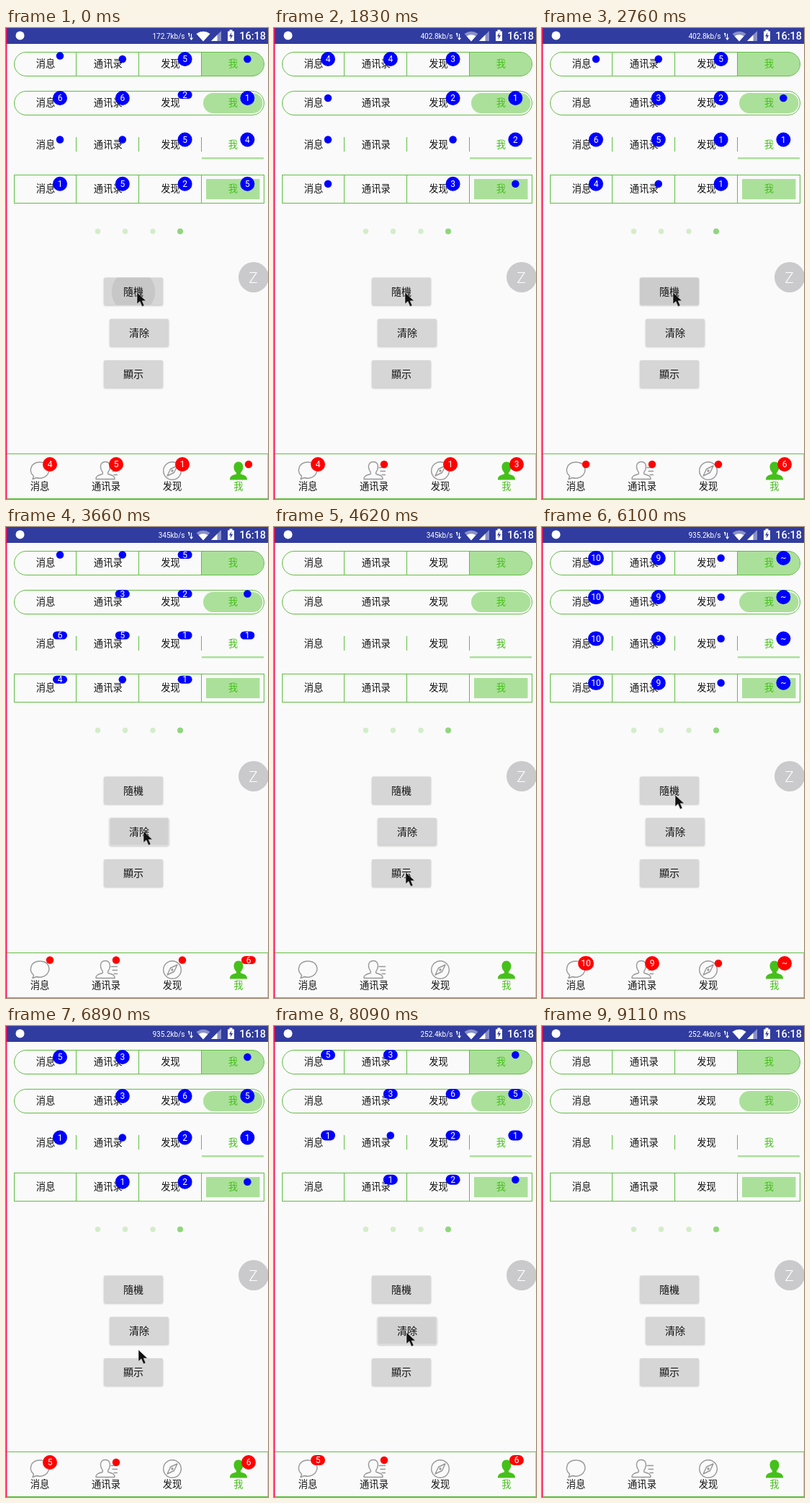
These frames come from a looping animation (364 px wide and 652 px high, 9.48 s). An HTML page:

```html
<!DOCTYPE html>
<html lang="zh">
<head>
<meta charset="utf-8">
<title>Badge demo</title>
<style>
  html, body { margin: 0; width: 100%; height: 100%; overflow: hidden; background: #fafafa; }
  svg { display: block; width: 364px; height: 652px; }
  text { font-family: "Noto Sans CJK SC", "Noto Sans CJK TC", "Noto Sans CJK", sans-serif; font-weight: 500; text-anchor: middle; fill: #111; }
  .tab { font-size: 13.3px; }
  .on { fill: #45c01a; }
  .btn { font-size: 14px; }
  .num { font: 12px Roboto, sans-serif; fill: #fff; }
  .status { font: 10px Roboto, sans-serif; fill: #fff; text-anchor: end; }
  .clock { font: 500 14.5px Roboto, sans-serif; fill: #fff; }
  .line { fill: none; stroke: #62bd45; }
  .icon { fill: none; stroke: #989898; stroke-width: 1.4; stroke-linejoin: round; }
  .lit { fill: #abe09a; }
  .soft { filter: drop-shadow(0 1px 1px rgba(0, 0, 0, .22)); }
</style>
</head>
<body>
<svg id="stage" viewBox="0 0 364 652">
  <defs>
    <clipPath id="face"><rect x="136" y="345.500" width="82" height="38" rx="2"/></clipPath>
  </defs>
  <rect width="364" height="652" fill="#fafafa"/>

  <g id="bar">
    <rect width="364" height="22" fill="#303c9f"/>
    <circle cx="19.500" cy="10.500" r="6" fill="#fff"/>
    <text id="speed" class="status" x="248.500" y="14.500"></text>
    <path d="M254.500 7v5M253 8.500l1.500-1.500M257.500 8v8M255.500 13.500l2 2.500 2-2.500" fill="none" stroke="#fff" stroke-width="1.2"/>
    <path d="M264.500 8Q274 1.500 283.500 8L274 18.500Z" fill="#8a91c9"/>
    <path id="wifi" fill="#fff"/>
    <path d="M299 4V18H285Z" fill="#8a91c9"/>
    <path d="M293.500 9.500V18H285Z" fill="#fff"/>
    <path d="M308 4.500h2.500v-2h4v2h2.500v13.500h-9Z" fill="#fff"/>
    <path d="M313.500 6l-3.500 5.500h2.300l-.8 4.500 3.600-6h-2.400Z" fill="#303c9f"/>
    <text class="clock" x="342.700" y="15.800">16:18</text>
  </g>

  <g id="frames">
    <path class="lit" d="M271.500 33.500H341.500A16.500 16.500 0 0 1 341.500 66.500H271.500Z"/>
    <rect class="line" x="11.500" y="33.500" width="347" height="33" rx="16.500"/>
    <rect class="line" x="11.500" y="87.500" width="347" height="33" rx="16.500"/>
    <rect class="lit" x="274" y="90" width="82.500" height="28" rx="14"/>
    <rect class="lit" x="272" y="179" width="86" height="2.500"/>
    <rect class="line" x="11.500" y="203.500" width="347" height="39"/>
    <rect class="lit" x="278" y="209" width="74.500" height="28"/>
    <path class="line" d="M97.500 33v33M184.500 33v33M271.500 33v33M97.500 151v20M184.500 151v20M271.500 151v20M97.500 203v40M184.500 203v40M271.500 203v40"/>
    <g fill="#d3edc9"><circle cx="127.500" cy="281.500" r="3.700"/><circle cx="165.500" cy="281.500" r="3.700"/><circle cx="204" cy="281.500" r="3.700"/></g>
    <circle cx="242" cy="281.500" r="4" fill="#8fd67c"/>
  </g>

  <g id="buttons"></g>
  <circle id="ripple" cx="177" cy="365" fill="#c7c7c8" clip-path="url(#face)"/>
  <g id="captions"></g>

  <circle cx="344" cy="345" r="21" fill="#cacacc"/>
  <text x="343.500" y="352.500" style="font:300 21px Roboto,sans-serif;fill:#fff">Z</text>

  <rect x="0" y="589.500" width="364" height="62" fill="#fafafa" stroke="#62bd45"/>
  <g class="icon">
    <path d="M38.500 620.500C31 614 34 601 47 601S62.500 612 57 619C53 623.500 46 624 42.500 622.500L37 624.500Z"/>
    <path d="M125 624.500C124.500 619.500 130 619 134 617.500C135.500 616 133.500 614 132.500 612C130 606 132 600.500 138 600.500S145.500 606 143.500 612C142.500 614 140.500 616 142 617.500C146 619 151.500 619.500 151 624.500Z"/>
    <path d="M145.500 608.500H155M147.500 613.500H155M149.500 618.500H155"/>
    <circle cx="231" cy="613" r="12.300"/>
    <path d="M238 606L233.500 615.500 224 620 228.500 610.500Z"/>
    <circle cx="231" cy="613" r="1"/>
  </g>
  <path class="on" d="M311 625.500C310.500 619.500 316 619 320 617.500V615.500C314.500 611 315.500 600.500 323 600.500S331.500 611 326 615.500V617.500C330 619 335.500 619.500 335 625.500Z"/>

  <g id="labels"></g>
  <g id="badges"></g>
  <rect width="1.300" height="652" fill="#ff0a55"/>
  <path id="cursor" d="M0 0V16L4 12.500 7 19.500 10 18.200 7.200 11.700H12.500Z" fill="#111" stroke="#eee" stroke-width=".5"/>
</svg>

<script>
const LOOP = 9480, GROW = 300;
const $ = id => document.getElementById(id);

function add(parent, tag, attrs, text) {
  const el = document.createElementNS('http://www.w3.org/2000/svg', tag);
  set(el, attrs);
  if (text) el.textContent = text;
  return parent.appendChild(el);
}
function set(el, attrs) {
  for (const k in attrs) el.setAttribute(k, attrs[k]);
}
const clamp = v => Math.max(0, Math.min(1, v));

// Screen updates come in bursts: first, last, count
const bursts = [[120, 420, 3], [1140, 1560, 4], [1830, 1830, 1], [2490, 3390, 8], [3660, 4620, 8],
  [4870, 5800, 8], [5950, 6100, 2], [6380, 7280, 8], [7430, 8450, 9], [8600, 9110, 5]];
const ticks = [0];
for (const [a, b, n] of bursts)
  for (let i = 0; i < n; i++) ticks.push(a + (b - a) * i / Math.max(1, n - 1));

// Badge sets, four per row: '.' is a dot, '-' is hidden
const parse = s => s.split(' ');
const none = Array(20).fill('-');
const first = parse('. . 5 . 6 6 2 1 . . 5 4 1 5 2 5 4 5 1 .');
const events = [
  { at: -165, set: first, button: 0 },
  { at: 1030, set: parse('4 4 3 - . - 2 1 . - . 2 . - 3 . 4 . 1 3'), button: 0 },
  { at: 2380, set: parse('. . 5 - - 3 2 . 6 5 1 1 4 . 1 - . . . 6'), button: 0 },
  { at: 3525, set: none, button: 1 },
  { at: 4760, set: parse(Array(5).fill('10 9 . ~').join(' ')), button: 2 },
  { at: 6270, set: parse('5 3 - . - 3 6 5 1 . 2 1 - 1 2 . 5 . - 6'), button: 0 },
  { at: 7977, set: none, button: 1 }
];
const before = first.map((v, i) => i === 0 || i === 6 ? '-' : v);

const speeds = [[0, '172.7'], [1830, '402.8'], [3100, '345'], [5700, '935.2'], [7600, '252.4']];
const path = [[0, 182, 366], [2800, 182, 366], [3390, 191, 421], [4050, 191, 421], [4620, 183, 478],
  [5400, 183, 478], [5800, 185, 402], [6100, 185, 371], [6640, 185, 371], [6890, 184, 448],
  [7150, 184, 462], [7430, 184, 462], [7940, 184, 424], [8200, 184, 424], [8450, 200, 450], [9110, 300, 656], [LOOP, 300, 656]];

const tabs = ['消息', '通讯录', '发现', '我'];
const rows = [49.5, 103.5, 161.5, 222.5, 634.5];
const tops = [33, 87, 144.5, 205.7, 594];
const badges = [];
rows.forEach((y, r) => tabs.forEach((name, c) => {
  const foot = r === 4;
  const shift = (foot ? 92 : 86.8) * c;
  add($('labels'), 'text', { class: c === 3 ? 'tab on' : 'tab', x: (foot ? 47 : 55) + shift, y: y + 4.7 }, name);
  const x = (foot ? 61 : 75) + shift;
  badges.push({
    x, top: tops[r],
    pill: add($('badges'), 'rect', { fill: foot ? '#f00' : '#00f' }),
    num: add($('badges'), 'text', { class: 'num', x })
  });
}));

const buttons = [['隨機', 136, 345.5], ['清除', 144, 402.7], ['顯示', 136, 460]].map(([name, x, y]) => {
  add($('captions'), 'text', { class: 'btn', x: x + 41, y: y + 24.3 }, name);
  return add($('buttons'), 'rect', { class: 'soft', x, y, width: 82, height: 38, rx: 2 });
});

function drawBadge(b, from, to, p) {
  const gone = to === '-';
  const label = gone ? from : to;
  const space = label === '-' ? 0 : gone ? 20 * (1 - p) : from === '-' ? 20 * p : 20;
  const dot = label === '.';
  const mid = b.top + space / 2;
  const height = dot ? Math.min(10.5, space) : space;
  const width = dot ? 10.5 : label.length > 1 ? 22 : 20;
  set(b.pill, { x: b.x - width / 2, y: mid - height / 2, width, height, rx: height / 2 });
  b.num.textContent = dot || space < 8 ? '' : label;
  b.num.setAttribute('y', mid + 4.2);
}

function draw(time) {
  const t = ticks.filter(k => k <= time + 15).pop();

  const i = events.filter(e => e.at <= t).length - 1;
  const now = events[i], from = i ? events[i - 1].set : before;
  const p = (t - now.at) / GROW;
  badges.forEach((b, n) => drawBadge(b, from[n], now.set[n], clamp(p)));

  buttons.forEach((el, n) => {
    const down = n && n === now.button && p < 1.6;
    set(el, { fill: down ? '#d1d1d2' : '#d6d6d7', stroke: down ? '#e4e4e5' : 'none' });
  });
  set($('ripple'), { r: now.button ? 0 : 55 * clamp(p), opacity: clamp((1.7 - p) / 0.7) });

  $('speed').textContent = speeds.filter(s => s[0] <= t).pop()[1] + 'kb/s';
  const weak = t >= 120 && t < 8600;
  $('wifi').setAttribute('d', weak ? 'M267.500 11.300Q274 7 280.500 11.300L274 18.500Z' : 'M264.500 8Q274 1.500 283.500 8L274 18.500Z');

  const k = path.findIndex(q => q[0] > t);
  const [t0, x0, y0] = path[k - 1], [t1, x1, y1] = path[k];
  const f = (t - t0) / (t1 - t0);
  $('cursor').setAttribute('transform', `translate(${x0 + (x1 - x0) * f} ${y0 + (y1 - y0) * f})`);
}

const start = performance.now();
function loop() {
  draw((performance.now() - start) % LOOP);
  requestAnimationFrame(loop);
}
loop();
</script>
</body>
</html>
```
